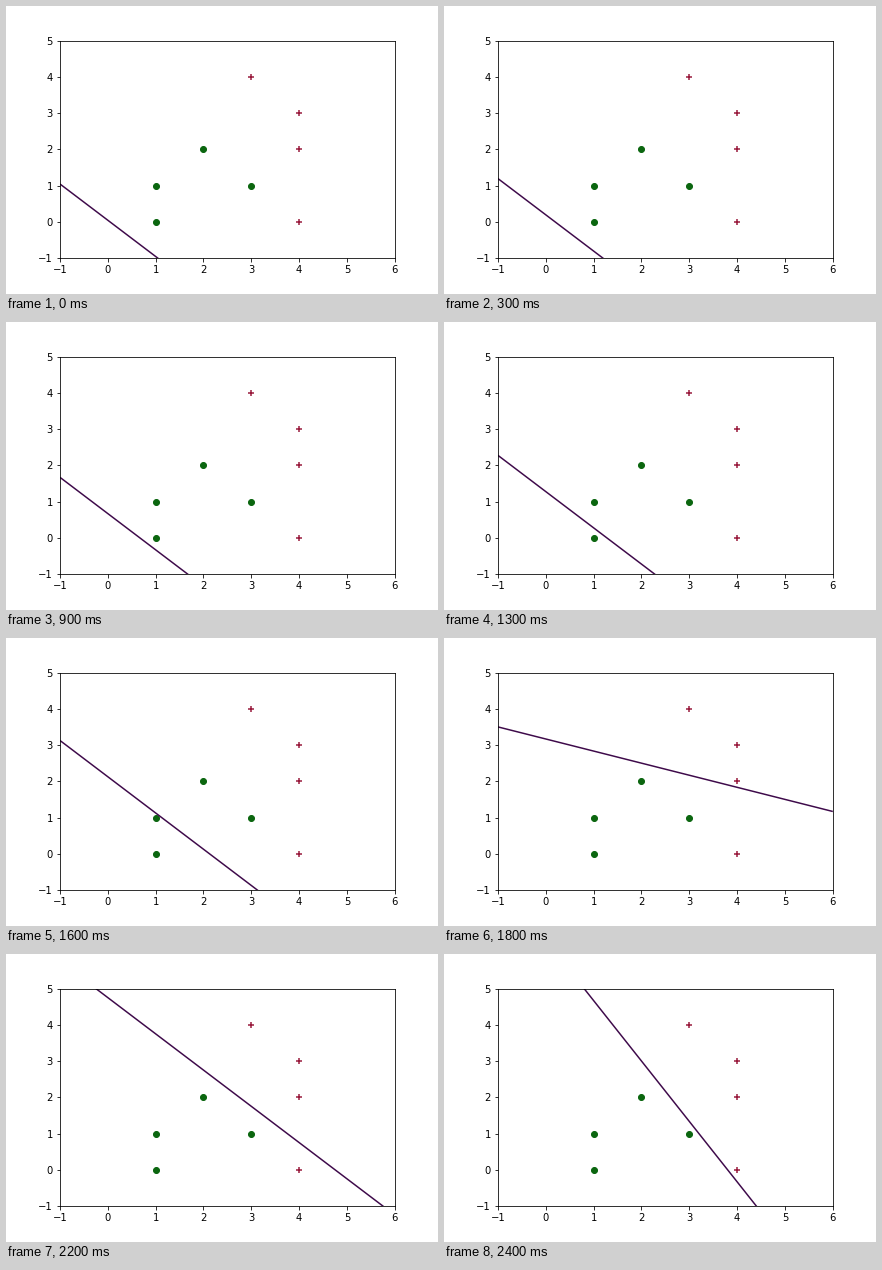
Write a matplotlib script that moves like this. It is 432 px wide and 288 px high and loops after 4 s.

```python
import numpy as np
import matplotlib.pyplot as plt
from matplotlib.animation import FuncAnimation

STEP_MS = 100
FRAMES = 40

GREEN = np.array([(1, 1), (3, 1), (2, 2), (1, 0)])
RED = np.array([(4, 0), (4, 2), (4, 3), (3, 4)])


def train(weights):
    """Perceptron: correct the first misplaced point until none is left."""
    points = np.vstack([GREEN, RED])
    points = np.column_stack([points, np.ones(len(points), int)])
    signs = np.array([-1] * len(GREEN) + [1] * len(RED))
    history = []
    while True:
        wrong = np.flatnonzero(signs * (points @ weights) <= 0)
        if len(wrong) == 0:
            return history
        i = wrong[0]
        weights = weights + signs[i] * points[i]
        history.append(weights)


history = train(np.array([25, 25, 0]))

fig, ax = plt.subplots(figsize=(6, 4), dpi=72)
fig.subplots_adjust(left=0.125, right=0.9, bottom=0.125, top=0.88)
ax.set_xlim(-1, 6)
ax.set_ylim(-1, 5)

ax.scatter(*GREEN.T, color="#0b660f", marker="o")
ax.scatter(*RED.T, color="#98183a", marker="+")
xs = np.array([-1.0, 6.0])
border, = ax.plot(xs, xs, color="#3e0a4a", lw=1.5, solid_capstyle="butt")


def draw(frame):
    a, b, c = history[min(frame, len(history) - 1)]
    border.set_ydata(-(a * xs + c) / b)
    return border,


anim = FuncAnimation(fig, draw, frames=FRAMES, interval=STEP_MS,
                     init_func=lambda: draw(0), repeat=True, repeat_delay=0)
plt.show()
```
